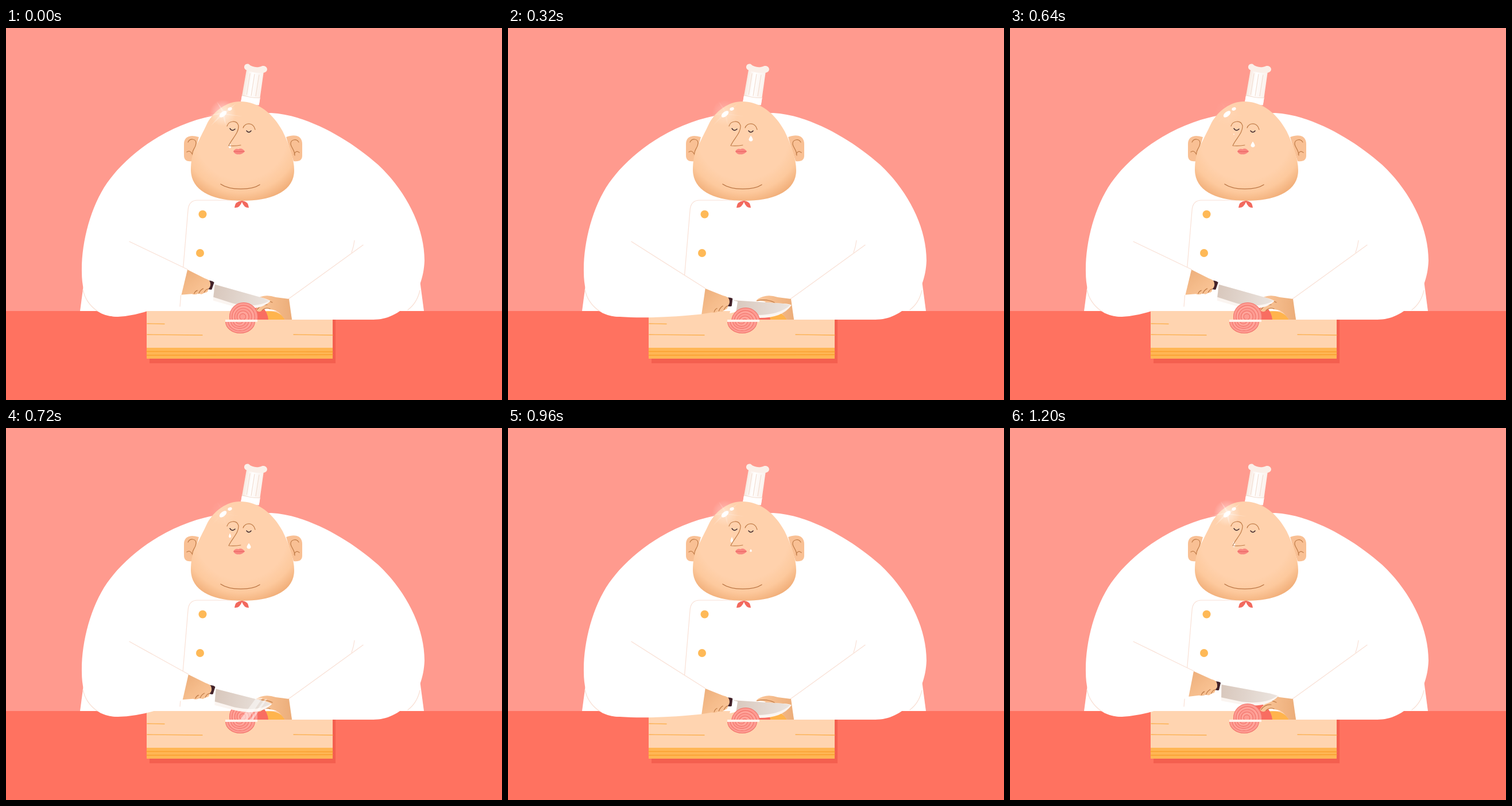
An HTML page for the animation above (1280 ms loop, 864x648 px).

```html
<!DOCTYPE html>
<html lang="en">
<head>
<meta charset="utf-8">
<title>Chef slicing</title>
<style>
html, body { margin: 0; width: 100%; height: 100%; overflow: hidden; background: #ff9a8e; }
svg { display: block; width: 100vw; height: 100vh; }
.line { fill: none; stroke-linecap: round; stroke-linejoin: round; }
.seam { stroke: #f9e0d5; stroke-width: 1.2; }
.brown { stroke: #c07c48; stroke-width: 1.2; }
.grain { stroke: #fbb04f; stroke-width: 1.4; }
</style>
</head>
<body>
<svg viewBox="0 0 864 648">
  <defs>
    <radialGradient id="skin" gradientUnits="userSpaceOnUse" cx="410" cy="184" r="122">
      <stop offset=".66" stop-color="#ffd1ac"/><stop offset=".84" stop-color="#fdc99d"/><stop offset="1" stop-color="#f2b07b"/>
    </radialGradient>
    <linearGradient id="palm" x1="0" y1="0" x2="1" y2="1">
      <stop offset="0" stop-color="#ecad79"/><stop offset=".5" stop-color="#f5bc8b"/><stop offset="1" stop-color="#fcc89c"/>
    </linearGradient>
    <linearGradient id="rest" x1="0" y1="0" x2="1" y2="0">
      <stop offset="0" stop-color="#fcc89c"/><stop offset="1" stop-color="#ecad79"/>
    </linearGradient>
    <linearGradient id="steel" x1="0" y1="0" x2="1" y2="0">
      <stop offset="0" stop-color="#d8c7bc"/><stop offset="1" stop-color="#ebe4df"/>
    </linearGradient>
    <linearGradient id="cloth" x1="0" y1="0" x2="1" y2="0">
      <stop offset="0" stop-color="#f8e8de"/><stop offset=".4" stop-color="#fff"/><stop offset="1" stop-color="#fbf1eb"/>
    </linearGradient>
    <radialGradient id="glow">
      <stop offset="0" stop-color="#fff" stop-opacity=".6"/><stop offset="1" stop-color="#fff" stop-opacity="0"/>
    </radialGradient>
    <clipPath id="above"><path d="M380 465H445V508H380Z"/></clipPath>
    <clipPath id="below"><path d="M378 512H440V540H378Z"/></clipPath>
  </defs>

  <path fill="#ff9a8e" d="M0 0H864V648H0Z"/>
  <path fill="#ff7260" d="M0 493H864V648H0Z"/>
  <path fill="#fff" d="M138 425L129 493H728L719 425Z"/>

  <!-- board -->
  <path fill="#f45f4f" d="M250 500H574V584H250Z"/>
  <path fill="#ffd4b0" d="M245 493H569V558H245Z"/>
  <path fill="#ffb654" d="M245 557H569V576H245Z"/>
  <path class="line" stroke="#f99f2e" stroke-width="1.4" d="M245 563.5L569 564M245 570L569 569"/>
  <path class="line grain" d="M246 515L276 515.5M246 534L342 535M501 534L569 535"/>

  <!-- jacket -->
  <path fill="#fff" d="M360 153C285 168 215 215 176 270C147 312 131 375 132 425C132 470 150 503 195 503L215 460H492V472L498 508H640C688 508 727 465 729 405C729 345 695 282 648 238C600 195 525 151 462 148Z"/>
  <path class="line seam" d="M134 456Q139 479 159 493M721 457Q716 479 700 491"/>
  <path class="line seam" d="M395 300H334Q318 300 317 318L303 485M622 378L492 472M607 370Q606 380 602 391"/>
  <g fill="#feb957"><circle cx="342.500" cy="324.500" r="7"/><circle cx="338" cy="392" r="7"/></g>

  <!-- hat -->
  <g transform="translate(425 131) rotate(9)">
    <path fill="url(#cloth)" d="M-16 1L-15 -58H15L16 1Q0 4 -16 1Z"/>
    <path fill="#fff" d="M-16 -10L-16 1Q0 4 16 0V-12Z"/>
    <path class="line" stroke="#f1dccf" stroke-width="1.1" d="M-16 -12Q0 -9 16 -12M-8 -51V-14M0 -51V-13M8 -51V-14"/>
    <path fill="#fbf0e9" d="M-14 -56C-22 -56 -22 -68 -13 -67C-6 -62 4 -63 10 -67C20 -71 25 -59 15 -56Q0 -52 -14 -56Z"/>
  </g>

  <!-- head -->
  <path fill="#f9c094" d="M336 190C321 185 310 189 310 202V222C310 231 316 233 324 232ZM488 190C504 184 516 188 516 202V222C516 231 510 233 501 232Z"/>
  <path class="line brown" d="M317 199C320 192 331 192 331 201C330 211 323 212 325 221M315 216Q320 212 324 219M510 199C506 192 495 194 496 203C498 210 503 213 503 222M511 217Q505 212 502 220"/>
  <path fill="url(#skin)" d="M408 128C440 128 466 150 482 180C494 205 502 228 502 248C502 285 462 301 412 301C362 301 323 285 322 248C322 232 324 222 328 212C336 195 343 182 351 165C363 144 384 128 408 128Z"/>
  <path fill="#f2695e" d="M410 301Q399 302 398 313Q407 314 411 303Q415 314 423 313Q422 302 412 301Z"/>
  <path fill="#f98780" d="M396 215Q399 209 405 211Q411 208 416 215Q411 221 405 220Q399 221 396 215Z"/>
  <path class="line" stroke="#e65e5d" d="M397 215Q405 216 415 215"/>
  <g id="tears" fill="#fff"><path/><path/></g>
  <path class="line brown" d="M385 171C388 161 402 160 405 170C406 183 393 193 388 205Q399 206 409 204M413 174C416 164 431 164 434 177"/>
  <path class="line" stroke="#b87342" stroke-width="1.4" d="M374 272C390 283 427 283 442 273"/>
  <path class="line" stroke="#3c272c" stroke-width="1.5" d="M390 175Q394 181 399 176M419 179Q423 184 427 179"/>
  <g id="shine">
    <circle cx="378" cy="148" r="23" fill="url(#glow)"/>
    <path fill="#fff" opacity=".3" d="M346 154L377 147L367 128L381 146L401 131L383 149L412 154L381 151L383 170L377 152L357 170L374 150Z"/>
  </g>
  <ellipse cx="378" cy="150" rx="7.500" ry="4" fill="#fff" transform="rotate(-40 378 150)"/>
  <ellipse cx="390" cy="141" rx="3.800" ry="2.700" fill="#fff" transform="rotate(-25 390 141)"/>

  <!-- food and resting hand -->
  <path fill="#ffb44d" d="M448 494Q476 490 486 508H448Z"/>
  <path fill="#f96d61" d="M404 508Q404 478 426 477Q454 482 457 508Z"/>
  <path fill="url(#rest)" d="M493 472L470 469Q455 464 444 468Q434 471 432 476Q441 474 449 477Q440 483 435 491Q440 497 446 492Q452 487 460 490Q472 491 478 498L486 508H498Z"/>
  <path class="line brown" d="M437 491Q444 481 455 482M446 492Q452 486 460 489M434 475Q450 471 464 478"/>

  <g id="stage">
    <g id="knife">
      <path fill="#fbf5f1" d="M5 -4L92 -2Q104 -2 107 0Q91 25 45 25L10 24Z"/>
      <path fill="url(#steel)" d="M6 -4L92 -2L105 0Q86 19 45 20L9 18Z"/>
      <path id="heel" fill="#fff" d="M4 -4L13 -2L11 16L0 19Z"/>
      <path fill="#43232a" d="M-6 -8Q1 -9 4 -7L3 6Q0 8 -6 6Z"/>
    </g>
    <g id="slice">
      <g clip-path="url(#above)"><g id="top"></g></g>
      <g clip-path="url(#below)"><g id="low"></g></g>
      <path fill="#fff1ea" d="M382 508H438V512H382Z"/>
    </g>
    <path id="glint" fill="#fff" opacity=".5" d="M6 -16L17 -16L-9 22H-22ZM21 -14L25 -14L0 22H-5Z"/>
    <g id="hand">
      <path fill="url(#palm)" d="M-44 -25L-12 -12Q-3 -10 -2 -6Q1 1 -4 6Q-4 13 -11 13Q-14 18 -20 15Q-26 19 -32 17L-51 20Z"/>
      <path class="line brown" d="M-4 6Q-8 6 -11 13M-13 6Q-18 9 -20 15M-23 10Q-27 12 -28 16"/>
    </g>
    <path id="sleeve" fill="#fff"/>
    <path id="fold" class="line seam"/>
  </g>
</svg>
<script>
const $ = id => document.getElementById(id);
const LOOP = 1280, STEP = 80;

// one chop: handle x, handle y, blade angle, slice drop
const chop = [
  [357, 449, 14.5, 0], [359, 457, 13, 0], [364, 471, 10, 3], [372, 480, 6.5, 6],
  [387, 478, 2.5, 9], [384, 460, -5, 2], [377, 456, 0, 1], [362, 450, 9, 2]
];

function rings(cx, cy, rx, ry) {
  return [1, .8, .61, .42, .22].map((k, i) =>
    `<ellipse cx="${cx - i * .4}" cy="${cy}" rx="${rx * k}" ry="${ry * k}"
      fill="${i % 2 ? '#ffa49a' : '#fd9b92'}" stroke="#f2736a" stroke-width="1.1"/>`).join('');
}
$('top').innerHTML = rings(414, 503, 24.5, 24.5);
$('low').innerHTML = rings(408, 511, 25.5, 20.5);

function tear(el, x, y, age, width) {
  const s = Math.max(0, Math.min(1, .3 + age / 160, (1000 - age) / 400));
  const visible = age >= 0 && age < 960;
  el.setAttribute('d', visible ? 'M0 -5.500Q4 0 3.500 2Q2.500 4.500 0 4.500Q-2.500 4.500 -3.500 2Q-4 0 0 -5.500Z' : '');
  el.setAttribute('transform', `translate(${x} ${y + age * .032}) scale(${s * width} ${s})`);
}

function draw(time) {
  const t = Math.floor((time % LOOP) / STEP) * STEP;
  const phase = t / STEP % 8;
  const [x, y, angle, drop] = chop[phase];
  const turn = .45 * (angle - 4), r = turn * Math.PI / 180;
  const at = (px, py) => [
    x + px * Math.cos(r) - py * Math.sin(r),
    y + px * Math.sin(r) + py * Math.cos(r)
  ];
  const upper = at(-43, -25), lower = at(-50, 20);

  $('knife').setAttribute('transform', `translate(${x} ${y}) rotate(${angle})`);
  $('hand').setAttribute('transform', `translate(${x} ${y}) rotate(${turn})`);
  $('sleeve').setAttribute('d', `M215 372L${upper}L${lower}Q250 ${500 + (lower[1] - 466) * .22} 195 503Q172 503 158 488Z`);
  $('fold').setAttribute('d', `M215 372L${upper}`);
  $('top').setAttribute('transform', `translate(0 ${drop})`);

  // the blade passes before the slice only as it first touches it
  $('stage').insertBefore($('slice'), phase === 1 ? $('knife') : $('glint'));
  $('heel').style.display = phase === 3 || phase === 4 ? '' : 'none';
  $('glint').style.display = phase === 1 || phase === 2 ? '' : 'none';
  $('glint').setAttribute('transform', `translate(${phase === 1 ? 430 : 404} 486)`);

  const [left, right] = $('tears').children;
  tear(left, 390, 185, (t - 640 + LOOP) % LOOP, .65);
  tear(right, 423, 188, t - 160, 1);
  $('shine').setAttribute('opacity', .55 + .45 * Math.cos((t - 1240) / LOOP * 2 * Math.PI));
}

function tick(now) {
  draw(now);
  requestAnimationFrame(tick);
}
draw(0);
requestAnimationFrame(tick);
</script>
</body>
</html>
```
